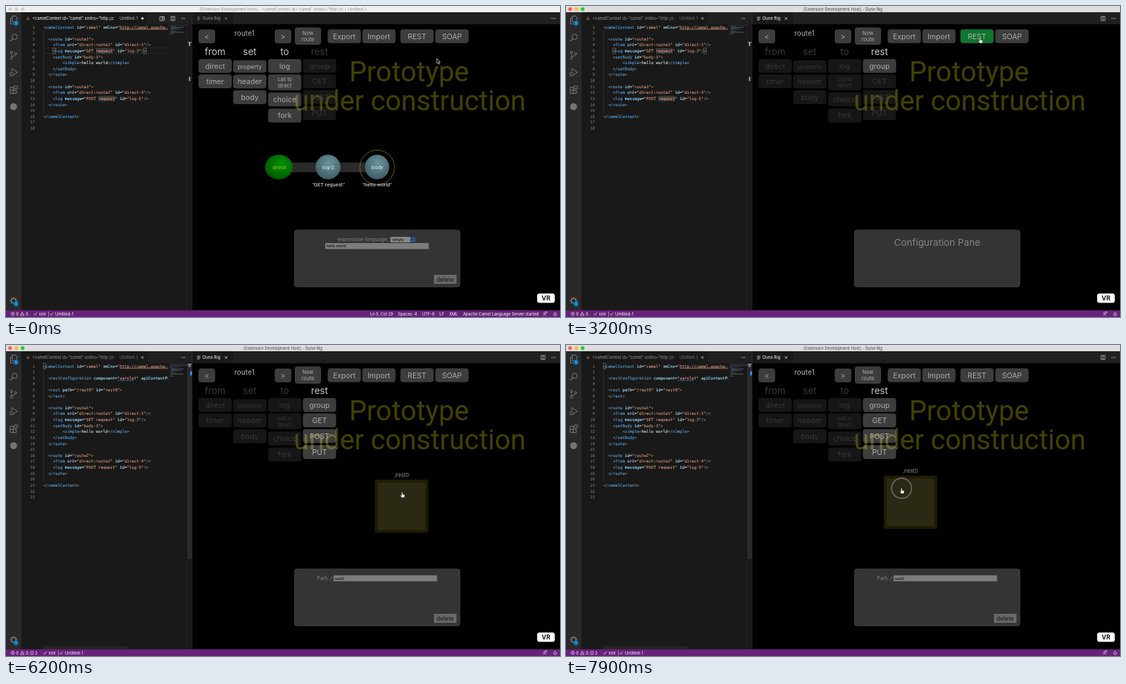
Animation of 800 by 450 pixels, one loop 8000 ms. Source, as an HTML page:

```html
<!DOCTYPE html>
<html lang="en">
<head>
<meta charset="utf-8">
<title>Route designer</title>
<style>
html, body { margin: 0; width: 100%; height: 100%; overflow: hidden; background: #000; }
svg { display: block; width: 800px; height: 450px; font-family: Inter, "Open Sans", sans-serif; }
text { white-space: pre; }
.code { font: 5.73px "DejaVu Sans Mono", monospace; stroke-width: .14px; }
.scene { font-family: Roboto, sans-serif; }
</style>
</head>
<body>
<svg id="stage" viewBox="0 0 800 450">
  <defs>
    <radialGradient id="green" cx=".6" cy=".38" r=".75"><stop offset="0" stop-color="#009200"/><stop offset="1" stop-color="#005000"/></radialGradient>
    <radialGradient id="steel" cx=".55" cy=".35" r=".75"><stop offset="0" stop-color="#6b949c"/><stop offset="1" stop-color="#38545e"/></radialGradient>
    <clipPath id="editorClip"><rect x="22" y="26" width="211.5" height="414"/></clipPath>
    <clipPath id="mapClip"><rect x="235" y="26" width="27" height="100"/></clipPath>
  </defs>
  <g id="frame"></g>
  <g id="editor"></g>
  <g id="scene" class="scene"></g>
  <g id="group"></g>
  <g id="controls"></g>
  <g id="status"></g>
  <g id="pointer">
    <circle id="ring" r="14.5" fill="none" stroke="#666" stroke-width="1.8"/>
    <path id="arrow" d="M0 0V7.2L1.7 5.6 2.9 8.2 4.1 7.7 2.9 5.2H5.2Z" fill="#111" stroke="#ddd" stroke-width=".7"/>
    <path id="hand" d="M-.8 .3Q0-.6 .8 .3V3L3.2 3.5Q4 3.8 3.8 5L3.2 7.8H-.6L-2.6 4.8Q-2.3 3.6-.8 5Z" fill="#fff" stroke="#222" stroke-width=".5"/>
  </g>
</svg>
<script>
const LOOP = 8000, REST_CLICK = 3000, GROUP_CLICK = 4600, CHECKED = 5500, GRAB = 6500;
const CHAR = 3.45, LINE = 8.62, LEFT = 54;
const APP = 'Dune Rig';
const $ = id => document.getElementById(id);
const esc = s => s.replace(/&/g, '&amp;').replace(/</g, '&lt;');

const rect = (x, y, w, h, fill, more = '') =>
  `<rect x="${x}" y="${y}" width="${w}" height="${h}" fill="${fill}" ${more}/>`;
const label = (x, y, s, size, fill, more = '') =>
  `<text x="${x}" y="${y}" font-size="${size}" fill="${fill}" ${more}>${esc(s)}</text>`;
const mid = (x, y, s, size, fill, more = '') => label(x, y, s, size, fill, 'text-anchor="middle" ' + more);
const line = (d, color, width = 1) =>
  `<path d="${d}" fill="none" stroke="${color}" stroke-width="${width}"/>`;
const dots = (x, y, color = '#c5c5c5') =>
  [-2.2, 0, 2.2].map(d => `<circle cx="${x + d}" cy="${y}" r=".65" fill="${color}"/>`).join('');

const head = '<camelContext id="camel" xmlns="http://camel.apache.org/schema/spring">';
const routes = [
  '  <route id="route1">', '    <from uri="direct:route1" id="direct-1"/>',
  '    <log message="GET request" id="log-2"/>', '    <setBody id="body-3">',
  '        <simple>hello world</simple>', '    </setBody>', '  </route>', '',
  '  <route id="route2">', '    <from uri="direct:route2" id="direct-4"/>',
  '    <log message="POST request" id="log-5"/>', '  </route>', '', '</camelContext>', '', ''];
const restBlock = [
  '  <restConfiguration component="servlet" apiContextPath="api-doc"/>', '',
  '  <rest path="/rest0" id="rest0">', '  </rest>', ''];
const sourceBefore = [head, '', ...routes];
const sourceAfter = [head, '', ...restBlock, ...routes];

function paintXml(s) {
  const span = (color, t, more = '') => `<tspan fill="${color}" stroke="${color}" ${more}>${esc(t)}</tspan>`;
  return s.replace(/(<\/?)(\w+)|(\w+)(=)|"([^"]*)"|(\/?>)|([^<>"]+?)(?=<|\s|$)/g,
    (m, open, tag, attr, eq, str, close) =>
      open ? span('#808080', open) + span('#569cd6', tag) :
      attr ? span('#9cdcfe', attr) + span('#d4d4d4', eq) :
      str !== undefined ? span('#ce9178', '"') + span('#ce9178', str, str.startsWith('http') ? 'text-decoration="underline"' : '') + span('#ce9178', '"') :
      span(close ? '#808080' : '#d4d4d4', m));
}

function drawEditor({ rest, grouped, checked }) {
  const lines = grouped ? sourceAfter : sourceBefore;
  const rowY = n => 30.5 + (n - 1) * LINE;
  const colX = c => LEFT + c * CHAR;
  const box = (c, n) => rect(colX(c), rowY(n) - 4, CHAR, 8, 'none', 'stroke="#888" stroke-width=".6"');
  const word = (c, n) => rect(colX(c), rowY(n) - 4, 7 * CHAR, 8, '#363636');
  let out = line(`M54.3 ${rowY(2) - 4}V${rowY(lines.length - 3) + 4}`, '#404040', .5), map = '', marks = '';
  if (!rest) out += line(`M54 ${rowY(5) - 4.2}H234M54 ${rowY(5) + 4.2}H234`, '#2c2c2c', .8);
  if (!grouped) out += word(22, 5) + word(23, 13) + box(4, 5) + box(42, 5);
  else out += checked ? box(0, 1) : box(1, 6);
  lines.forEach((s, i) => {
    const y = rowY(i + 1) + 2, indent = s.search(/\S|$/);
    out += label(41.8, y, String(i + 1), 5.73, '#858585', 'text-anchor="end" class="code"');
    out += `<text class="code" x="${colX(indent)}" y="${y}">${paintXml(s.trim())}</text>`;
    if (s.trim()) map += rect(236 + indent * .46, 27.7 + i * .86, (s.length - indent) * .46, .5, i ? '#7592a0' : '#3c80b0', 'opacity=".6"');
  });
  if (checked) out += line(`M${colX(31)} ${rowY(3) + 3.5}h${7 * CHAR}`, '#3794ff', .6);
  if (!grouped) marks = rect(262.5, 52, 5.5, 1.2, '#a0a0a0') + rect(264, 52, 2.3, 6, '#909090') + rect(264, 102.5, 2.3, 6, '#909090');
  else {
    marks = rect(262, 27, 6.5, 283, '#2a2a2a') + rect(54, 435.5, 123, 4.5, '#262626');
    if (checked) marks += rect(262.5, 27.5, 5.5, 1.2, '#b0b0b0') + rect(264, 27.5, 2.3, 4.5, '#909090') + rect(266, 38, 2.5, 6, '#3794ff');
  }
  $('editor').innerHTML = marks + `<g clip-path="url(#editorClip)">${out}</g><g clip-path="url(#mapClip)">${map}</g>`;
}

function activityIcons() {
  const c = '#7a7a7a';
  const badge = (x, y) => `<circle cx="${x}" cy="${y}" r="3.7" fill="#0070b8"/>` + mid(x, y + 1.7, '1', 4.8, '#fff');
  let gear = '';
  for (let a = 0; a < 8; a++) gear += `<path d="M11 421.3v2.2" stroke="${c}" stroke-width="1.7" transform="rotate(${a * 45} 11 426.5)"/>`;
  return line('M9 18V14.5H14L16 17V23H9ZM9 17.5H6.5V26H13V23', c) + badge(14.5, 25)
    + `<circle cx="12.5" cy="44.5" r="3.8" fill="none" stroke="${c}"/>` + line('M9.8 47.3L6 51.2', c, 1.2)
    + [[8, 67], [8, 75.5], [14, 69]].map(p => `<circle cx="${p[0]}" cy="${p[1]}" r="1.6" fill="none" stroke="${c}" stroke-width=".9"/>`).join('')
    + line('M8 68.6V74M14 70.6Q13.7 72.5 8 73', c, .9)
    + line('M8.3 95V90.5L16.5 96 11.5 99.4', c) + `<circle cx="8.3" cy="98.6" r="2.3" fill="none" stroke="${c}"/>` + line('M5 96.5l1.5 1M5 101l1.6-1M11.6 101l-1.5-1', c, .7)
    + line('M6 117.5h4.5v9H6ZM6 122h9v4.5H6M12 115.7h4.3V120H12Z', c)
    + '<circle cx="11" cy="145.7" r="5" fill="#757575"/>'
    + gear + `<circle cx="11" cy="426.5" r="3.2" fill="none" stroke="${c}" stroke-width="1.2"/>` + badge(14.5, 431);
}

function splitIcon(x) { return line(`M${x - 2.8} 15.2h5.6v5.8h-5.6ZM${x} 15.2v5.8`, '#c5c5c5', .8); }

function drawFrame({ rest }) {
  const file = '<camelContext id="camel" xmlns="http://c';
  const lights = rest ? ['#ff5f57', '#febc2e', '#28c840'] : ['#d0d0d0', '#d0d0d0', '#d0d0d0'];
  let out = rect(0, 0, 800, 450, '#191919') + rect(0, 0, 800, 9, rest ? '#dedede' : '#f0f0f0');
  lights.forEach((c, i) => out += `<circle cx="${6 + i * 9}" cy="4.5" r="2.7" fill="${c}"/>`);
  out += mid(400, 6.5, `[Extension Development Host] - ${rest ? APP : file + ' • Untitled-1'}`, 5.8, rest ? '#444' : '#909090');
  out += rect(0, 9, 22.5, 431.3, '#292929') + activityIcons();
  out += rect(22.5, 9, 777.5, 17.4, '#202020') + rect(22.5, 9, 182, 17.4, '#191919') + rect(269, 9, 59, 17.4, '#191919');
  out += line('M30.5 16.2q3 .2 3 3.6M30.5 18q1.4.2 1.4 1.8', '#e37933', .8) + '<circle cx="30.9" cy="19.7" r=".7" fill="#e37933"/>';
  out += label(38, 20, file, 5.8, rest ? '#969696' : '#fff') + label(164, 20, 'Untitled-1', 5.8, rest ? '#777' : '#c0c0c0');
  out += `<circle cx="197" cy="18" r="1.8" fill="${rest ? '#777' : '#ddd'}"/>` + dots(256, 18) + dots(790.5, 18);
  out += rest ? splitIcon(775.5)
    : splitIcon(241) + line('M222 15.5h6.5v5.5h-6.5ZM225.3 15.5v5.5', '#c5c5c5', .8) + `<circle cx="227" cy="17" r="1.6" fill="none" stroke="#c5c5c5" stroke-width=".7"/>`;
  const tab = rest ? '#fff' : '#969696';
  out += line('M276 16.2h4.5M276 18.2h4.5M276 20.2h3.5', tab, .7) + label(284, 20.2, APP, 6, tab) + line('M316 16.3l3.6 3.6M319.6 16.3L316 19.9', tab, .7);
  out += line('M234.5 27V440', '#242424', .6) + line('M262 27V440', '#2a2a2a', .6);
  out += rect(268.5, 26.4, 531.5, 414, '#000') + line('M268.7 9V440', '#3a3a3a', .6);
  $('frame').innerHTML = out;
}

function drawScene({ rest }) {
  const sphere = (x, rx, fill, name, color) =>
    `<ellipse cx="${x}" cy="233" rx="${rx}" ry="17.8" fill="url(#${fill})"/>` + mid(x + .5, 236, name, 7.8, color);
  let out = mid(582, 109, 'Prototype', 40.2, '#434000') + mid(583, 151, 'under construction', 40, '#434000');
  if (!rest) {
    out += rect(408, 226.5, 112, 14, '#2a2a2a')
      + sphere(394, 20, 'green', 'direct', '#9cc030') + sphere(465, 18, 'steel', 'log-2', '#eee') + sphere(535.8, 17.6, 'steel', 'body', '#eee')
      + '<circle cx="536" cy="233.5" r="25" fill="none" stroke="#837e00" stroke-width=".8"/>'
      + mid(465.5, 261, '"GET request"', 7.7, '#eee') + mid(536, 261, '"hello world"', 7.7, '#eee');
  }
  $('scene').innerHTML = out;
}

function button(x, cy, name, { on = true, green = '', w = 48, h = 20, size = 10.6 } = {}) {
  const rows = name.split('\n'), step = size * 1.2;
  let out = rect(x, cy - h / 2, w, h, green || (on ? '#fff' : '#777'), `rx="4" fill-opacity="${green ? 1 : on ? .24 : .19}"`);
  rows.forEach((s, i) => out += mid(x + w / 2, cy + size * .36 + (i - (rows.length - 1) / 2) * step, s, size, on ? '#acacac' : '#383838'));
  return out;
}

function drawControls({ rest, grouped, hover }) {
  const green = name => hover === name ? (name === 'REST' ? '#11752f' : '#0b5526') : '';
  let out = button(278, 44, '<', { w: 24 }) + button(388, 44, '>', { w: 24 }) + label(329.8, 43, 'route1', 10.3, '#b0b0b0');
  out += button(417, 43.5, 'New\nroute', { w: 38, h: 25, size: 7.5 });
  out += button(464.5, 43.7, 'Export') + button(514.5, 43.7, 'Import') + button(569.5, 43.7, 'REST', { green: green('REST') }) + button(620, 43.7, 'SOAP');
  const columns = [
    ['from', 278, [['direct', 86.7], ['timer', 109]]],
    ['set', 328, [['property', 87.5, { h: 18, size: 8.6 }], ['header', 109.3], ['body', 132]]],
    ['to', 378.5, [['log', 86.7], ['call to\ndirect', 110.5, { h: 23, size: 7.4 }], ['choice', 135.3], ['fork', 158.5]]],
    ['rest', 428.7, [['group', 86.7], ['GET', 109], ['POST', 131.7], ['PUT', 155]]]];
  for (const [title, x, items] of columns) {
    const active = (title === 'rest') === rest;
    out += mid(x + 24, 70.7, title, 13.5, active ? '#c8c8c8' : '#3a3a3a');
    for (const [name, y, more] of items) {
      const on = active && (!rest || grouped || name === 'group');
      out += button(x, y, name, { on, green: green(name), ...more });
    }
  }
  out += rect(416.5, 324, 239, 82.5, '#343434', 'rx="4" stroke="#404040" stroke-width=".8"');
  const field = (x, y, s) => rect(x, y, 149.5, 8.6, '#7c7c7c') + label(x + 1.8, y + 6.2, s, 5.4, '#000');
  if (!rest) {
    out += label(479, 340, 'expression language:', 7.3, '#868686') + rect(555, 334, 36, 8, '#848484', 'rx="1"')
      + label(558, 340, 'simple', 5.3, '#000') + rect(584, 334, 6.5, 8, '#163f80', 'rx="1"')
      + line('M585.8 337.3l1.4-1.6 1.4 1.6M585.8 339l1.4 1.6 1.4-1.6', '#aaa', .6) + field(461, 343, 'hello world');
  } else if (grouped) out += label(449, 340, 'Path: /', 7.3, '#868686') + field(473, 333.3, 'rest0');
  else out += mid(536, 347, 'Configuration Pane', 13.7, '#868686');
  if (!rest || grouped) out += rect(618, 389, 32.5, 13, '#6a6a6a') + mid(634.3, 398.7, 'delete', 8.6, '#111');
  out += rect(767, 416, 25.5, 13.5, '#fff', 'rx="3.5"') + mid(779.8, 426, 'VR', 8.8, '#111', 'font-weight="700"');
  $('controls').innerHTML = out;
}

function drawStatus({ rest, checked }) {
  const say = (x, s) => label(x, 447.6, s, 5.8, '#fff');
  const tick = x => line(`M${x} 445.7l1.5 1.7 2.9-3.8`, '#fff', .7);
  const circle = x => `<circle cx="${x}" cy="445.5" r="2.3" fill="none" stroke="#fff" stroke-width=".6"/>`;
  const shift = checked ? 14 : 0;
  let out = rect(0, 440.3, 800, 9.7, '#68217a') + circle(9.8) + line('M8.8 444.5l2 2M10.8 444.5l-2 2', '#fff', .5) + say(14.5, '0')
    + line('M20.6 447.8l2.8-5 2.8 5ZM23.4 444.5v1.7', '#fff', .6) + say(28.5, '0');
  if (checked) out += circle(37.5) + line('M37.5 445.2v1.4', '#fff', .6) + say(42, '2');
  out += `<g transform="translate(${shift})">${tick(40.3)}${say(47.5, 'xml')}${say(60.2, '|')}${tick(63.6)}${say(71, 'Untitled-1')}</g>`;
  if (!rest) out += [[526, 'Ln 5, Col 29'], [566, 'Spaces: 4'], [601, 'UTF-8'], [626, 'LF'], [640, 'XML'], [660, 'Apache Camel Language Server started']].map(p => say(...p)).join('');
  out += '<circle cx="777.7" cy="444.4" r="1.3" fill="none" stroke="#fff" stroke-width=".6"/>' + line('M775.5 448.2q2.2-4 4.4 0M778.5 442.5h2.5v2h-1', '#fff', .6)
    + line('M790.5 447h4.8l-.8-1.2v-1.5q-1.6-2.6-3.2 0v1.5ZM792.3 448h1.3', '#fff', .6);
  $('status').innerHTML = out;
}

// Pointer path: time, x, y
const path = [[0, 622, 76], [600, 620, 72], [1500, 603.5, 34], [2100, 601, 41], [2800, 598, 46], [3500, 598, 46],
  [4350, 454, 86], [5250, 454, 86], [6100, 572, 213], [GRAB, 572, 213], [7300, 495, 212], [LOOP, 484, 207]];
function pointerAt(t) {
  const i = Math.max(1, path.findIndex(p => p[0] > t));
  const [t0, x0, y0] = path[i - 1], [t1, x1, y1] = path[i];
  const k = (t - t0) / (t1 - t0), e = k * k * (3 - 2 * k);
  return [x0 + (x1 - x0) * e, y0 + (y1 - y0) * e];
}

$('group').innerHTML = mid(571.5, 190.5, '/rest0', 7.4, '#999')
  + rect(534.7, 196.7, 73, 73, '#2b2814', 'stroke="#1e1c00" stroke-width="4"');

let shown = '';
function render(t) {
  const [x, y] = pointerAt(t);
  const rest = t >= REST_CLICK, grouped = t >= GROUP_CLICK, checked = t >= CHECKED;
  const inside = (l, top, r, b) => x > l && x < r && y > top && y < b;
  const hover = rest && inside(570, 34, 618, 54) ? 'REST' : rest && inside(429, 77, 477, 97) ? 'group' : '';
  const stage = { rest, grouped, checked, hover }, key = JSON.stringify(stage);
  if (key !== shown) {
    shown = key;
    [drawFrame, drawEditor, drawScene, drawControls, drawStatus].forEach(draw => draw(stage));
  }
  const held = t >= GRAB;
  const show = (id, on) => $(id).setAttribute('visibility', on ? 'visible' : 'hidden');
  show('group', grouped);
  show('ring', held);
  const hand = hover || checked && inside(533, 195, 610, 272) || held;
  show('hand', hand);
  show('arrow', !hand);
  $('pointer').setAttribute('transform', `translate(${x} ${y})`);
  $('group').setAttribute('transform', held ? `translate(${(x - 572) * .845} ${y - 213})` : '');
}

const start = performance.now();
function tick() {
  render((performance.now() - start) % LOOP);
  requestAnimationFrame(tick);
}
tick();
</script>
</body>
</html>
```
